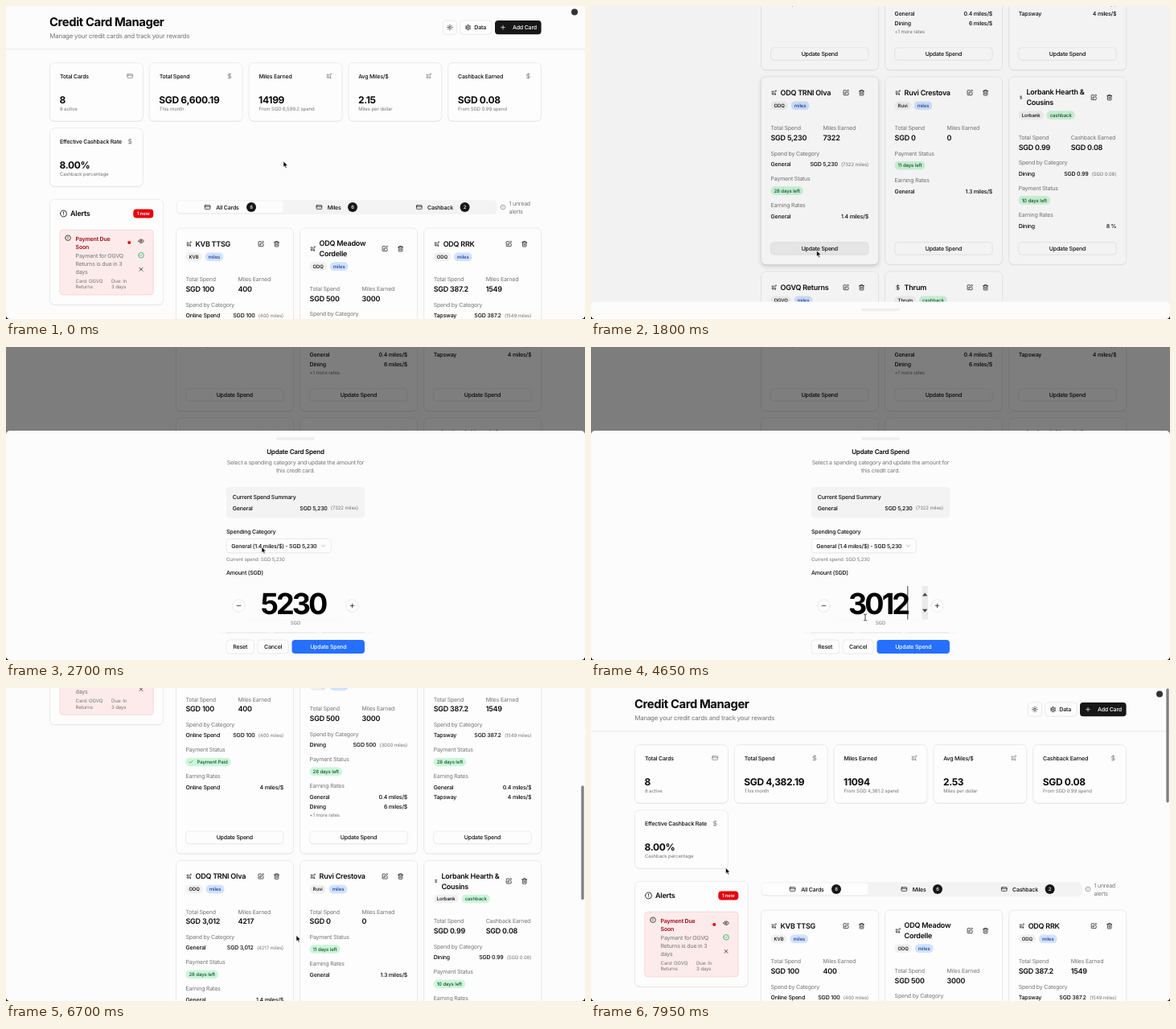
Animation of 720x389 px, one loop 8000 ms. Source, as an HTML page:

```html
<!DOCTYPE html>
<html lang="en">
<head>
<meta charset="utf-8">
<title>Credit Card Manager</title>
<style>
  html, body { margin: 0; width: 100%; height: 100%; overflow: hidden; background: #fcfcfc; }
  svg { display: block; width: 100vw; height: 100vh; }
  text { font-family: Inter, sans-serif; text-rendering: geometricPrecision; }
  .lift { filter: drop-shadow(0 2px 2.5px rgba(0,0,0,.16)); }
</style>
</head>
<body>
<svg id="stage" viewBox="0 0 720 389" preserveAspectRatio="none">
  <rect width="720" height="389" fill="#fcfcfc"/>
  <g id="page"></g>
  <rect id="thumb" x="715.3" width="3.4" height="142" rx="1.7" fill="#808080"/>
  <rect id="overlay" width="720" height="389"/>
  <g id="drawer"></g>
  <g id="cursor"></g>
  <path d="M0 384.5V389H4.5A4.5 4.5 0 0 1 0 384.5ZM720 384.5V389H715.5A4.5 4.5 0 0 0 720 384.5Z" fill="#111"/>
</svg>
<script>
const $ = id => document.getElementById(id);
const INK = '#0a0a0a', GRAY = '#737373', LINE = '#e0e0e2', RED = '#e7000b';
const pen = document.createElement('canvas').getContext('2d');

// letter spacing is looser in the smallest text
const tracking = size => size * (size < 7 ? -.015 : -.027);
const measure = (str, size, weight, spacing = tracking(size)) => {
  pen.font = `${weight} ${size}px Inter, sans-serif`;
  return pen.measureText(str).width + spacing * str.length;
};

// y is the optical centre of the line
const text = (x, y, str, size = 7, weight = 400, fill = INK, anchor = 'start') =>
  `<text x="${x}" y="${y + size * .36}" font-size="${size}" font-weight="${weight}" fill="${fill}" text-anchor="${anchor}" letter-spacing="${tracking(size)}">${str}</text>`;
const rect = (x, y, w, h, r, fill, stroke = 'none', extra = '') =>
  `<rect x="${x}" y="${y}" width="${w}" height="${h}" rx="${r}" fill="${fill}" stroke="${stroke}" stroke-width=".6" ${extra}/>`;
const circle = (x, y, r, fill, stroke = 'none') =>
  `<circle cx="${x}" cy="${y}" r="${r}" fill="${fill}" stroke="${stroke}" stroke-width=".6"/>`;
const panel = (x, y, w, h, lifted) =>
  rect(x, y + .9, w, h, 6, 'rgba(0,0,0,.07)') + rect(x, y, w, h, 6, '#fdfdfd', LINE, lifted ? 'class="lift"' : '');
const button = (x, y, w, h, label, fill = '#fdfdfd') =>
  rect(x, y + .6, w, h, 4, 'rgba(0,0,0,.04)') + rect(x, y, w, h, 4, fill, LINE) +
  text(x + w / 2, y + h / 2, label, 7, 500, INK, 'middle');
const amountLine = (right, y, amount, note) => {
  const label = `(${note})`, x = right - measure(label, 6, 400);
  return text(x - 4.2, y, amount, 7, 500, INK, 'end') + text(x, y, label, 6, 400, GRAY);
};

const ring = r => `M${12 - r} 12a${r} ${r} 0 1 0 ${2 * r} 0a${r} ${r} 0 1 0-${2 * r} 0`;
const ICONS = {
  card: 'M4 5h16a2 2 0 0 1 2 2v10a2 2 0 0 1-2 2H4a2 2 0 0 1-2-2V7a2 2 0 0 1 2-2zM2 10h20',
  dollar: 'M12 2v20M17 5H9.5a3.5 3.5 0 0 0 0 7h5a3.5 3.5 0 0 1 0 7H6',
  plane: 'M17.8 19.2 16 11l3.5-3.5C21 6 21.5 4 21 3c-1-.5-3 0-4.5 1.5L13 8 4.8 6.2c-.5-.1-.9.1-1.1.5l-.3.5c-.2.5-.1 1 .3 1.3L9 12l-2 3H4l-1 1 3 2 2 3 1-1v-3l3-2 3.5 5.3c.3.4.8.5 1.3.3l.5-.2c.4-.3.6-.7.5-1.2z',
  alert: ring(10) + 'M12 7v5M12 16h.01',
  eye: 'M2 12c4-9 16-9 20 0c-4 9-16 9-20 0' + ring(3),
  done: ring(10) + 'M8.5 12l2.5 2.5 5-5',
  close: 'M18 6 6 18M6 6l12 12',
  edit: 'M12 3H5a2 2 0 0 0-2 2v14a2 2 0 0 0 2 2h14a2 2 0 0 0 2-2v-7M18.4 2.6a2.1 2.1 0 0 1 3 3L12 15l-4 1 1-4z',
  trash: 'M3 6h18M19 6v14a2 2 0 0 1-2 2H7a2 2 0 0 1-2-2V6M8 6V4a2 2 0 0 1 2-2h4a2 2 0 0 1 2 2v2M10 11v6M14 11v6',
  sun: ring(4) + 'M12 2v2M12 20v2M5 5l1.4 1.4M17.6 17.6 19 19M2 12h2M20 12h2M5 19l1.4-1.4M17.6 6.4 19 5',
  gear: ring(8) + ring(3) + 'M12 2v2M12 20v2M3.3 7 5 8M19 16l1.7 1M3.3 17 5 16M19 8l1.7-1',
  plus: 'M5 12h14M12 5v14',
  minus: 'M5 12h14',
  check: 'M20 6 9 17l-5-5',
  chevron: 'm6 9 6 6 6-6',
};
const icon = (name, x, y, size = 8, color = INK) =>
  `<path d="${ICONS[name]}" transform="translate(${x - size / 2} ${y - size / 2}) scale(${size / 24})" fill="none" stroke="${color}" stroke-width="2.1" stroke-linecap="round" stroke-linejoin="round"/>`;

const TINTS = { plain: ['#f0f0f1', INK], miles: ['#d0e2fe', '#1c398e'], green: ['#cdf5da', '#0d542b'] };
function badge(x, y, label, tint, iconName) {
  const [fill, ink] = TINTS[tint], lead = iconName ? 10 : 0;
  const w = measure(label, 6, 500) + 8 + lead;
  const svg = rect(x, y - 5.3, w, 10.6, 5, fill) + text(x + 4 + lead, y, label, 6, 500, ink) +
    (iconName ? icon(iconName, x + 6.5, y, 6, ink) : '');
  return { svg, w };
}

function statCard(i, title, iconName, value, note) {
  const x = 54.5 + (i % 5) * 123.8, y = 70.5 + Math.floor(i / 5) * 81.3;
  return panel(x, y, 115.8, 72.6) + text(x + 12.4, y + 16.5, title, 7, 500) + icon(iconName, x + 99.7, y + 16.5, 8, GRAY) +
    text(x + 12, y + 45.7, value, 12, 700) + text(x + 12.4, y + 57, note, 6, 400, GRAY);
}

const ROWS = [{ top: 276, h: 255.5 }, { top: 540, h: 233.3 }, { top: 782, h: 240 }];

function spendCard(card, i, hover) {
  const col = i % 3, { top, h } = ROWS[Math.floor(i / 3)];
  const x = 211.5 + col * 154.1, left = x + 12, right = x + 133.6;
  const wrap = card.title.length > 1 ? 11.8 : 0, head = top + 19.7 + wrap / 2;
  const hot = hover && i === 3, cash = card.kind === 'cashback';
  let svg = panel(x, top, 146, h, hot);
  svg += icon(cash ? 'dollar' : 'plane', x + (cash && wrap ? 15 : 16), head, cash && wrap ? 5 : 7.5);
  card.title.forEach((line, n) => svg += text(x + (cash && wrap ? 21.7 : 24), head + (n - (card.title.length - 1) / 2) * 13, line, 9, 600));
  svg += icon('edit', x + 105.5, head) + icon('trash', x + 125, head);
  const bank = badge(left, top + 35.8 + wrap, card.bank, 'plain');
  svg += bank.svg + badge(left + bank.w + 4, top + 35.8 + wrap, card.kind, cash ? 'green' : 'miles').svg;
  if (!card.spend) return svg;

  let y = top + 63.8 + wrap;
  [['Total Spend', card.spend, 12], [cash ? 'Cashback Earned' : 'Miles Earned', card.earned, 77]].forEach(([label, value, dx]) =>
    svg += text(x + dx, y, label, 7, 400, GRAY) + text(x + dx, y + 11.7, value, 9, 600));
  y += 31.2;
  const heading = label => svg += text(left, y, label, 7, 400, GRAY);
  if (card.category) {
    heading('Spend by Category');
    svg += text(left, y + 13.6, card.category, 7, 500) +
      amountLine(right, y + 13.6, card.spend, cash ? card.earned : card.earned + ' miles');
    y += 31.4;
  }
  heading('Payment Status');
  svg += badge(left, y + 15.2, card.status, 'green', card.paid && 'check').svg;
  y += card.paid ? 32.3 : 33.2;
  heading('Earning Rates');
  card.rates.forEach(([label, rate], n) =>
    svg += text(left, y + 14 + n * 12, label, 7, 500) + text(right, y + 14 + n * 12, rate, 7, 500, INK, 'end'));
  if (card.more) svg += text(left, y + 36.5, card.more, 6, 400, GRAY);
  return svg + button(left, top + h - 27.7, 121.6, 15.4, 'Update Spend', hot && hover > 1 ? '#eeeeef' : undefined);
}

const cards = saved => [
  { title: ['KVB TTSG'], bank: 'KVB', kind: 'miles', spend: 'SGD 100', earned: '400', category: 'Online Spend', status: 'Payment Paid', paid: true, rates: [['Online Spend', '4 miles/$']] },
  { title: ['ODQ Meadow', 'Cordelle'], bank: 'ODQ', kind: 'miles', spend: 'SGD 500', earned: '3000', category: 'Dining', status: '28 days left', rates: [['General', '0.4 miles/$'], ['Dining', '6 miles/$']], more: '+1 more rates' },
  { title: ['ODQ RRK'], bank: 'ODQ', kind: 'miles', spend: 'SGD 387.2', earned: '1549', category: 'Tapsway', status: '28 days left', rates: [['General', '0.4 miles/$'], ['Tapsway', '4 miles/$']] },
  { title: ['ODQ TRNI Olva'], bank: 'ODQ', kind: 'miles', spend: saved ? 'SGD 3,012' : 'SGD 5,230', earned: saved ? '4217' : '7322', category: 'General', status: '28 days left', rates: [['General', '1.4 miles/$']] },
  { title: ['Ruvi Crestova'], bank: 'Ruvi', kind: 'miles', spend: 'SGD 0', earned: '0', status: '11 days left', rates: [['General', '1.3 miles/$']] },
  { title: ['Lorbank Hearth &amp;', 'Cousins'], bank: 'Lorbank', kind: 'cashback', spend: 'SGD 0.99', earned: 'SGD 0.08', category: 'Dining', status: '10 days left', rates: [['Dining', '8 %']] },
  { title: ['OGVQ Returns'], bank: 'OGVQ', kind: 'miles' },
  { title: ['Thrum'], bank: 'Thrum', kind: 'cashback' },
];

function drawPage(saved, hover) {
  const tab = (x, label, labelX, count, badgeX) => icon('card', x, 250, 8) + text(labelX, 250, label, 7, 500) +
    circle(badgeX, 250, 6, '#171717') + text(badgeX, 250, count, 6, 500, '#fff', 'middle');
  const lines = (x, y, step, size, color, weight, ...rows) => rows.map((row, i) => text(x, y + i * step, row, size, weight, color)).join('');
  return [
    text(54, 20, 'Credit Card Manager', 14.8, 700), text(54.3, 36.7, 'Manage your credit cards and track your rewards', 7.9, 400, GRAY),
    rect(0, 53.5, 720, .7, 0, LINE), circle(707, 7.5, 4, '#333'),
    button(543.3, 18, 17.2, 17.2, ''), icon('sun', 551.9, 26.6),
    button(564.6, 18, 39.6, 17.2, ''), icon('gear', 574.6, 26.6), text(582.3, 26.6, 'Data', 7, 500),
    rect(608, 18, 57.6, 17.2, 4, '#171717'), icon('plus', 618, 26.6, 8, '#fff'), text(630, 26.6, 'Add Card', 7, 500, '#fff'),
    statCard(0, 'Total Cards', 'card', '8', '8 active'),
    statCard(1, 'Total Spend', 'dollar', saved ? 'SGD 4,382.19' : 'SGD 6,600.19', 'This month'),
    statCard(2, 'Miles Earned', 'plane', saved ? '11094' : '14199', `From SGD ${saved ? '4,381.2' : '6,599.2'} spend`),
    statCard(3, 'Avg Miles/$', 'plane', saved ? '2.53' : '2.15', 'Miles per dollar'),
    statCard(4, 'Cashback Earned', 'dollar', 'SGD 0.08', 'From SGD 0.99 spend'),
    statCard(5, 'Effective Cashback Rate', 'dollar', '8.00%', 'Cashback percentage'),
    panel(54.5, 240.3, 140.8, 131), icon('alert', 71.5, 258, 9.5), text(80, 258, 'Alerts', 9, 600),
    rect(158.3, 252.6, 25, 11, 4, RED), text(170.8, 258.1, '1 new', 6, 600, '#fff', 'middle'),
    rect(66.8, 278.2, 116.4, 80.8, 4, '#fdebeb', '#f7c4c4'), icon('alert', 77, 288.2),
    lines(86.6, 289.2, 10, 7, '#9f0712', 600, 'Payment Due', 'Soon'), circle(153.2, 294, 2, RED),
    icon('eye', 168, 292.2), icon('done', 168, 309.8, 8, '#00a63e'), icon('close', 168, 327.3),
    lines(86.6, 310.6, 10, 7, GRAY, 400, 'Payment for OGVQ', 'Returns is due in 3', 'days'),
    lines(86.6, 341.6, 7.7, 6, GRAY, 400, 'Card: OGVQ', 'Returns'), lines(131, 341.6, 7.7, 6, GRAY, 400, 'Due: In', '3 days'),
    rect(211.5, 241.3, 399, 17.8, 5, '#f3f3f4'), rect(212.7, 243, 132, 14.8, 4, 'rgba(0,0,0,.06)'), rect(212.7, 242.6, 132, 14.6, 4, '#fdfdfd'),
    tab(250.6, 'All Cards', 261.2, 8, 305), tab(389.4, 'Miles', 399.7, 6, 431), tab(513.8, 'Cashback', 524, 2, 570.6),
    icon('alert', 618, 250, 7, GRAY), lines(625.5, 245.4, 9.8, 7, GRAY, 400, '1 unread', 'alerts'),
    ...cards(saved).map((card, i) => spendCard(card, i, hover)),
  ].join('');
}

function drawDrawer() {
  const middle = (y, str, size, weight, color) => text(360, y, str, size, weight, color, 'middle');
  return [
    `<path d="M0 400V109a5 5 0 0 1 5-5H715a5 5 0 0 1 5 5V400Z" fill="#fcfcfc"/>`,
    rect(336, 112.2, 48, 3.6, 1.8, '#eeeeef'),
    middle(130, 'Update Card Spend', 8, 600),
    middle(143.5, 'Select a spending category and update the amount for', 7, 400, GRAY), middle(153.5, 'this credit card.', 7, 400, GRAY),
    rect(274, 174, 172, 38.5, 4, '#f3f3f3'), text(281.8, 186.5, 'Current Spend Summary', 7, 500),
    text(281.8, 200.3, 'General', 7, 500), amountLine(438, 200.3, 'SGD 5,230', '7322 miles'),
    text(274, 229.6, 'Spending Category', 7, 500), rect(274, 239.2, 130.5, 17.4, 4, 'rgba(0,0,0,.04)'), rect(274, 238.5, 130.5, 17.2, 4, '#fdfdfd', LINE),
    text(280.3, 247.1, 'General (1.4 miles/$) - SGD 5,230', 7, 500), icon('chevron', 394.5, 247.2, 8, '#999'),
    text(274, 264, 'Current spend: SGD 5,230', 6, 400, GRAY), text(274, 280.5, 'Amount (SGD)', 7, 500),
    circle(289.5, 321.6, 7.7, '#fdfdfd', '#dcdcde'), icon('minus', 289.5, 321.6), circle(430.5, 321.6, 7.7, '#fdfdfd', '#dcdcde'), icon('plus', 430.5, 321.6),
    rect(301, 297.6, 118, 41.6, 4, 'rgba(0,0,0,.02)'), rect(301, 297, 118, 41.6, 4, '#fcfcfc'),
    '<g id="field"></g>', middle(342.6, 'SGD', 6, 400, GRAY),
    rect(265, 355, 190, .5, 0, '#ececee'), ...[274, 333.5, 393].map(x => rect(x, 354.6, 53, .7, 0, '#dcdcde')),
    button(274, 364, 34.6, 17, 'Reset'), button(313, 364, 38.2, 17, 'Cancel'),
    `<g id="submit">${rect(355.5, 364, 90.5, 17, 4, '#2670ff')}${text(400.8, 372.5, 'Update Spend', 7, 500, '#fff', 'middle')}</g>`,
  ].join('');
}

const FOCUS = 2950, SELECT = 3050, TYPING = [[0, '5230'], [3300, ''], [3600, '3'], [3850, '30'], [4100, '301'], [4350, '3012']];
function drawField(t) {
  const value = TYPING.filter(([at]) => at <= t).pop()[1], center = 357, spacing = -2.9;
  const half = measure(value, 36, 700, spacing) / 2;
  let svg = '';
  if (t >= SELECT && t < TYPING[1][0]) svg += rect(center - half, 297.5, half * 2, 41, 0, '#b4d5fe');
  svg += `<text x="${center - half}" y="332" font-size="36" font-weight="700" letter-spacing="${spacing}">${value}</text>`;
  const typing = t >= TYPING[1][0];
  if (t >= FOCUS && (t < SELECT || typing) && (t < 4350 || (t - 4350) % 1000 < 500)) svg += rect(center + half - .6, 297, .8, 41.5, 0, INK);
  if (t >= 2850) svg += rect(411.5, 297, 7.5, 41.5, 0, '#ebebeb') +
    '<path d="M412 309.5h6.4l-3.2-4zM412 325.8h6.4l-3.2 4z" fill="#444"/>';
  $('submit').setAttribute('opacity', value ? (t > 5030 ? .9 : 1) : .5);
  return svg;
}

const clamp = u => Math.min(1, Math.max(0, u));
const smooth = (t, from, to) => { const u = clamp((t - from) / (to - from)); return u * u * (3 - 2 * u); };

// cubic-bezier(.32, .72, 0, 1) over half a second
function glide(t, start) {
  const u = clamp((t - start) / 500);
  let lo = 0, hi = 1, s = .5;
  for (let i = 0; i < 24; i++) {
    s = (lo + hi) / 2;
    if (.96 * s * (1 - s) ** 2 + s ** 3 < u) lo = s; else hi = s;
  }
  return u === 0 ? 0 : 2.16 * s * (1 - s) ** 2 + 3 * s * s * (1 - s) + s ** 3;
}

const PATH = [[0, 345, 193], [850, 345, 193], [1600, 280.6, 304], [1850, 280.6, 304], [2600, 318, 248.5], [2700, 318, 248.5], [2950, 320, 321],
  [3500, 320, 322], [4620, 341, 336], [4700, 341, 336], [5080, 376, 367], [5400, 373.6, 368.6], [5650, 373.6, 368.6], [6700, 361, 307.5], [7950, 167.5, 223.5], [8000, 167.5, 223.5]];
function pointer(t) {
  const i = PATH.findIndex(p => p[0] > t), [t0, x0, y0] = PATH[i - 1], [t1, x1, y1] = PATH[i];
  const k = smooth(t, t0, t1);
  return [x0 + (x1 - x0) * k, y0 + (y1 - y0) * k];
}
const ARROW = '<path d="M0 0V7.3L1.7 5.8 2.8 8.4 4.1 7.9 3 5.3H5.3Z" fill="#000" stroke="#fff" stroke-width=".6"/>';
const IBEAM = '<path d="M-2-4Q0-4 0-3Q0-4 2-4M0-3V3M-2 4Q0 4 0 3Q0 4 2 4" fill="none" stroke="#222" stroke-width=".8"/>';

const OPEN = 1785, SAVE = 5427;
$('drawer').innerHTML = drawDrawer();
const drawn = {};
function fill(id, html) {
  if (drawn[id] !== html) $(id).innerHTML = drawn[id] = html;
}

function frame(now) {
  const t = now % 8000;
  const scroll = 452 * (smooth(t, 60, 900) - smooth(t, 6060, 7900));
  const shown = t < SAVE ? glide(t, OPEN) : 1 - glide(t, SAVE + 8);
  const hover = t > 1200 && t < 1950 ? (t > 1500 ? 2 : 1) : 0;
  const [x, y] = pointer(t);

  fill('page', drawPage(t >= SAVE, hover));
  $('page').setAttribute('transform', `translate(0 ${-scroll})`);
  $('thumb').setAttribute('y', .5 + scroll * .371);
  $('thumb').setAttribute('opacity', t < 4000 ? smooth(t, 60, 110) * (1 - smooth(t, 1300, 1550)) : smooth(t, 6050, 6110));
  $('overlay').setAttribute('opacity', .5 * shown);
  $('drawer').setAttribute('transform', `translate(0 ${(1 - shown) * 285})`);
  $('drawer').setAttribute('visibility', shown > 0 ? 'visible' : 'hidden');
  fill('field', drawField(t));
  fill('cursor', t > 2850 && t < 4850 ? IBEAM : ARROW);
  $('cursor').setAttribute('transform', `translate(${x} ${y})`);
  requestAnimationFrame(frame);
}
requestAnimationFrame(frame);
</script>
</body>
</html>
```
